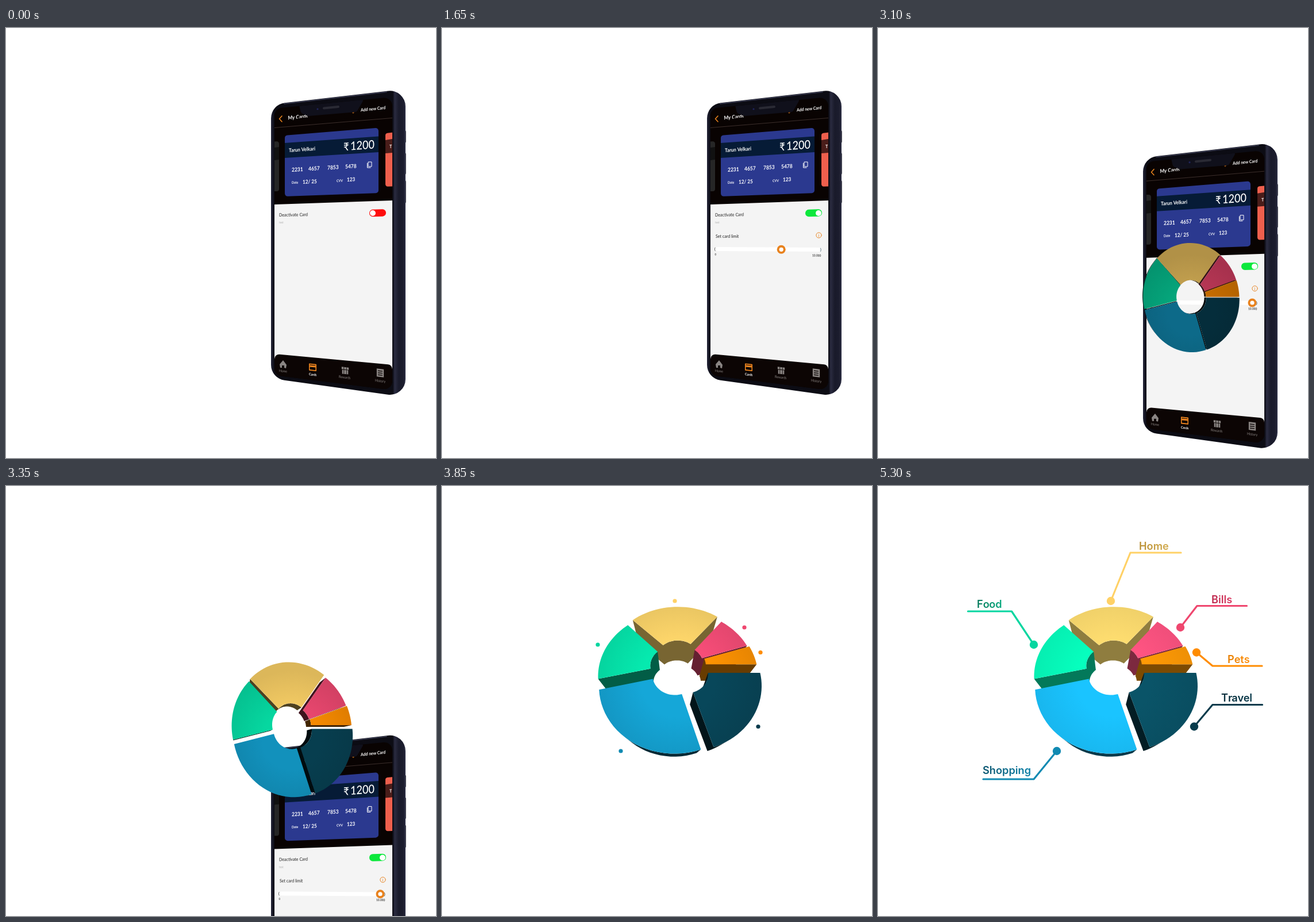
Recreate the animation shown at these times as an HTML page with a canvas. Size 748 px wide and 748 px high, loop 5350 ms.

```html
<!DOCTYPE html>
<html lang="en">
<head>
<meta charset="utf-8">
<title>Card spending</title>
<style>
html, body { margin: 0; width: 100%; height: 100%; overflow: hidden; background: #fff; }
canvas { display: block; width: 748px; height: 748px; }
</style>
</head>
<body>
<canvas id="stage" width="748" height="748"></canvas>
<script>
const ctx = document.getElementById('stage').getContext('2d');
const LOOP = 5350, STEP = 50;
const UI = 'Lato, "Noto Sans", sans-serif';

const clamp = v => Math.max(0, Math.min(1, v));
const span = (t, from, to) => clamp((t - from) / (to - from));
const smooth = v => v * v * (3 - 2 * v);
const mix = (a, b, f) => a + (b - a) * f;

// Piecewise linear value through [time, value] pairs
function track(t, keys) {
  let value = keys[0][1];
  for (let i = 1; i < keys.length; i++) {
    value = mix(value, keys[i][1], span(t, keys[i - 1][0], keys[i][0]));
  }
  return value;
}

function polygon(points, fill) {
  ctx.beginPath();
  points.forEach(p => ctx.lineTo(...p));
  ctx.closePath();
  ctx.fillStyle = fill;
  ctx.fill();
}

function roundPath(points, radius) {
  const last = points[points.length - 1], first = points[0];
  ctx.beginPath();
  ctx.moveTo((last[0] + first[0]) / 2, (last[1] + first[1]) / 2);
  points.forEach((p, i) => ctx.arcTo(...p, ...points[(i + 1) % points.length], radius));
  ctx.closePath();
}

function roundPoly(points, radius, fill) {
  roundPath(points, radius);
  ctx.fillStyle = fill;
  ctx.fill();
}

function line(points, color, width) {
  ctx.beginPath();
  points.forEach(p => ctx.lineTo(...p));
  ctx.strokeStyle = color;
  ctx.lineWidth = width;
  ctx.stroke();
}

function circle(x, y, r, fill) {
  ctx.beginPath();
  ctx.arc(x, y, r, 0, 2 * Math.PI);
  ctx.fillStyle = fill;
  ctx.fill();
}

// Draws in the plane of the turned screen, with the origin at x, y
function onScreen(x, y, draw) {
  ctx.save();
  ctx.transform(0.88, (y - 362) * 0.00042, 0, 1, x, y);
  draw();
  ctx.restore();
}

function label(text, x, y, size, color = '#fff', weight = 700) {
  onScreen(x, y, () => {
    ctx.font = `${weight} ${size}px ${UI}`;
    ctx.fillStyle = color;
    ctx.fillText(text, 0, 0);
  });
}

function drawBody() {
  [[178, 200], [217, 255], [265, 305]].forEach(([a, b]) =>
    roundPoly([[690, a], [695.7, a], [695.7, b], [690, b]], 2, '#10111c'));
  const metal = ctx.createLinearGradient(461, 0, 695, 0);
  [[0, '#25263a'], [0.025, '#0b0b13'], [0.905, '#0c0c14'], [0.92, '#2a2b40'],
   [0.95, '#191a2a'], [0.985, '#1c1d2e'], [1, '#303248']]
    .forEach(stop => metal.addColorStop(...stop));
  roundPoly([[461, 133], [695, 106], [695, 642], [461, 609.5]], 27, metal);
  line([[484, 131.8], [662, 111.3]], '#3c3e55', 1.6);
}

function drawCards() {
  roundPoly([[455, 198], [475, 197], [475, 284], [455, 284]], 4, '#262626');
  polygon([[467, 208], [475, 207], [475, 229], [467, 230]], '#111');
  roundPoly([[660, 183], [690, 180], [690, 275], [660, 276]], 4, '#ee5f4d');
  polygon([[660, 195], [672, 193], [672, 217], [660, 218]], '#4a1d1a');
  label('T', 667, 209, 8);

  roundPoly([[485, 187], [648, 173.5], [648, 287], [485, 293]], 5, '#2b398f');
  polygon([[485, 200], [648, 188.5], [648, 216], [485, 226]], '#061b36');
  label('Tarun Velkari', 492, 216, 9);
  label('₹', 587, 213.5, 19, '#fff', 500);
  label('1200', 599, 212.5, 20.5, '#fff', 500);
  ['2231', '4657', '7853', '5478'].forEach((digits, i) =>
    label(digits, 497 + i * 31 - (i == 1 ? 2 : 0), 250 - i * 1.8, 9.6));
  label('Date', 497, 271, 6);
  label('12/ 25', 516, 271, 9.3);
  label('CVV', 575, 268, 6);
  label('123', 593, 267, 9.3);
  ctx.strokeStyle = '#fff';
  ctx.lineWidth = 1;
  ctx.strokeRect(630.5, 233, 5.5, 8);
  line([[628.5, 235], [628.5, 243], [634, 243]], '#fff', 1);
}

function drawSettings(t) {
  label('Deactivate Card', 475, 328, 8, '#333', 500);
  label('test', 475, 340, 5.2, '#aaa', 400);
  const on = span(t, 900, 1050);
  roundPoly([[632, 316], [661, 315], [661, 327.5], [632, 328.5]], 6, on < 0.5 ? '#fe0c0c' : '#0ce83c');
  circle(mix(638, 655, on), 322, 5, '#fff');

  ctx.globalAlpha = span(t, 1050, 1250);
  label('Set card limit', 476, 365, 8, '#333', 500);
  ctx.beginPath();
  ctx.arc(655.5, 360.5, 4.6, 0, 7);
  ctx.strokeStyle = '#e8821e';
  ctx.lineWidth = 1;
  ctx.stroke();
  label('i', 654.5, 363.5, 7, '#e8821e');
  roundPoly([[475, 381], [660, 382], [660, 389], [475, 388]], 3, '#fff');
  label('(', 474, 387, 7, '#333');
  label(')', 658, 388, 7, '#245');
  label('0', 474.5, 395.5, 5, '#444');
  label('10.000', 644, 397.5, 5.6, '#444');
  const knob = mix(478, 651, smooth(span(t, 1300, 1883)));
  circle(knob, 385.3, 7.5, '#e8821e');
  circle(knob, 385.3, 3.6, '#fff');
  ctx.globalAlpha = 1;
}

function drawNav() {
  roundPoly([[467, 567], [672, 586], [672, 660], [467, 640]], 8, '#0c0504');
  const grey = '#8a8583';
  polygon([[476, 585], [482, 578], [488, 586], [487, 592], [484, 591], [484, 587],
           [480, 587], [480, 591], [477, 591]], grey);
  onScreen(533.5, 590, () => {
    ctx.strokeStyle = ctx.fillStyle = '#f0861f';
    ctx.lineWidth = 1.8;
    ctx.strokeRect(-6.5, -5, 13, 10.5);
    ctx.fillRect(-6, -3, 12, 3);
  });
  onScreen(590, 595, () => {
    ctx.fillStyle = grey;
    ctx.fillRect(-7, -5, 14, 4);
    ctx.fillRect(-6, 0, 12, 7);
    ctx.fillStyle = '#0c0504';
    ctx.fillRect(-3, -5, 1, 12);
    ctx.fillRect(2, -5, 1, 12);
  });
  onScreen(651, 600, () => {
    ctx.fillStyle = grey;
    ctx.fillRect(-7, -7, 14, 14);
    ctx.fillStyle = '#0c0504';
    [-4, -0.5, 3].forEach(y => ctx.fillRect(-4.5, y, 9, 1.4));
  });
  label('Home', 475, 598, 6, grey, 400);
  label('Cards', 527, 604, 6);
  label('Rewards', 579, 608.5, 6.2, grey, 400);
  label('History', 642, 615, 6.4, grey, 400);
}

function drawPhone(t) {
  const black = '#090302';
  ctx.save();
  ctx.translate(0, 0.927 * Math.max(0, t - 3000));
  drawBody();
  ctx.save();
  roundPath([[467, 140], [672, 120], [672, 630], [467, 604]], 14);
  ctx.clip();
  ctx.fillStyle = black;
  ctx.fillRect(460, 100, 220, 550);
  polygon([[467, 307], [672, 300], [672, 610], [467, 590]], '#f4f4f4');
  label('My Cards', 490.5, 159.5, 9.2);
  line([[480, 153], [475.5, 158], [480, 163]], '#e8821e', 1.6);
  label('+', 602, 150, 8, '#e8821e');
  polygon([[507, 157], [608, 148.5], [608, 156], [507, 166]], black);
  label('Add new Card', 617, 145.5, 7.8);
  line([[467, 173.5], [672, 156.5]], '#4a3a36', 0.8);
  roundPoly([[508, 125], [620, 113], [621, 127], [610, 146], [526, 153], [513, 148]], 5, '#10101b');
  line([[553, 139.5], [578, 137]], '#2a2a34', 4);
  circle(542, 141, 1.6, '#20235c');
  drawCards();
  drawSettings(t);
  drawNav();
  ctx.restore();
  ctx.restore();
}

// Angles in degrees, clockwise from the right; push is the final offset in radii.
// Listed from back to front.
const SLICES = [
  { from: 225, to: 309, push: [0, -0.142], flat: [255, 209, 102], lit: [255, 222, 112], wall: 0.52 },
  { from: 167, to: 226, push: [-0.077, -0.023], flat: [6, 214, 160], lit: [6, 255, 190], wall: 0.44 },
  { from: 309, to: 342, push: [0.054, -0.036], flat: [239, 71, 111], lit: [255, 84, 130], wall: 0.45 },
  { from: 342, to: 360, push: [0.086, -0.025], flat: [255, 140, 0], lit: [255, 154, 5], wall: 0.45 },
  { from: 0, to: 73, push: [0.108, 0.108], flat: [7, 59, 76], lit: [10, 84, 104], wall: 0.32 },
  { from: 73, to: 167, push: [-0.035, 0.133], flat: [17, 138, 178], lit: [26, 196, 255], wall: 0.27 }
];
const HOLE = 0.3;

function sliceOutline({ from, push }, end, project, spread) {
  const points = [], count = 24;
  const add = (radius, f) => {
    const a = mix(from, end, f) * Math.PI / 180;
    points.push(project(push[0] * spread + radius * Math.cos(a), push[1] * spread + radius * Math.sin(a)));
  };
  for (let i = 0; i <= count; i++) add(1, i / count);
  for (let i = count; i >= 0; i--) add(HOLE, i / count);
  return points;
}

function drawWalls(points, eye, depth, fill) {
  const sink = ([x, y]) => [mix(x, eye[0], depth), mix(y, eye[1], depth)];
  ctx.beginPath();
  points.forEach((a, i) => {
    const b = points[(i + 1) % points.length], a2 = sink(a), b2 = sink(b);
    const facing = (b[0] - a[0]) * (a2[1] - a[1]) - (b[1] - a[1]) * (a2[0] - a[0]);
    if (facing >= 0) return;
    ctx.moveTo(...a);
    [b, b2, a2].forEach(p => ctx.lineTo(...p));
    ctx.closePath();
  });
  ctx.fillStyle = fill;
  ctx.fill();
}

function drawPie(t) {
  const sweep = 360 * span(t, 2450, 3000);
  if (!sweep) return;
  const u = span(t, 3000, 3800), swing = u * (1 - u);
  const cx = mix(564, 410, u), cy = mix(487, 313, u - 0.15 * swing);
  const rx = mix(75, 127, u) + 12 * swing, ry = mix(83, 108, u) + 67 * swing;
  const tilt = 0.175 * u ** 1.4, skew = 0.2 * swing;
  const project = (x, y) => {
    const near = 1 / (1 - tilt * y);
    return [cx + rx * (x + skew * y) * near, cy + ry * y * near];
  };
  const eye = [400, 430 + 70 * u];
  const light = track(t, [[3100, 0], [3550, 0.4], [4600, 0.72], [5300, 1]]);
  const dim = track(t, [[3000, 1], [3100, 0.77], [3400, 1]]);
  const wallLight = track(t, [[3550, 0.6], [3800, 0.9], [5300, 1.08]]);
  const falloff = track(t, [[3000, 1], [3100, 0.9], [4600, 0.88], [5300, 0.92]]);

  for (const slice of SLICES) {
    const end = Math.min(slice.to, sweep);
    if (end <= slice.from) continue;
    const tone = f => `rgb(${slice.flat.map((v, i) => Math.round(mix(v, slice.lit[i], light) * dim * f))})`;
    const points = sliceOutline(slice, end, project, u);
    if (u) drawWalls(points, eye, 0.15 * u, tone(slice.wall * wallLight));
    const sheen = ctx.createRadialGradient(cx, cy + 25, rx * 0.5, cx, cy + 25, rx * 1.2);
    sheen.addColorStop(0, tone(1));
    sheen.addColorStop(1, tone(falloff));
    polygon(points, sheen);
  }
  if (sweep < 360) line([project(HOLE, 0), project(1, 0.02)], '#e8891c', 2);
}

const CALLOUTS = [
  { text: 'Home', at: [454, 110.5], ink: ['#b98f35', '#d2ac50'], color: '#ffd166', path: [[405, 200], [439, 116], [527, 116]] },
  { text: 'Food', at: [172, 212], ink: ['#087a5c', '#0aab80'], color: '#06d6a0', path: [[271, 276], [232.5, 218], [156.5, 218]] },
  { text: 'Bills', at: [580, 204], ink: ['#bd2a4e', '#dc3f66'], color: '#ef476f', path: [[526, 246], [555, 208.5], [641.5, 208.5]] },
  { text: 'Pets', at: [608, 308], ink: ['#e67e00', '#ff9210'], color: '#ff8c00', path: [[554, 289.5], [582, 313], [668, 313]] },
  { text: 'Travel', at: [597, 375], ink: ['#052c3a', '#08394a'], color: '#073b4c', path: [[550, 418.5], [582, 380.5], [668.5, 380.5]] },
  { text: 'Shopping', at: [182, 501], ink: ['#0b5670', '#1183aa'], color: '#118ab2', path: [[311, 461], [271, 510], [183, 510]] }
];

function drawCallout({ text, at, ink, color, path: [a, b, c] }, t) {
  const first = Math.hypot(b[0] - a[0], b[1] - a[1]);
  const second = Math.abs(c[0] - b[0]);
  const drawn = span(t, 3850, 4400) * (first + second);
  const f = clamp(drawn / first), g = clamp((drawn - first) / second);
  const points = [a, [mix(a[0], b[0], f), mix(a[1], b[1], f)]];
  if (g) points.push([mix(b[0], c[0], g), b[1]]);
  line(points, color, 3.2);
  circle(...a, 7.2 * span(t, 3800, 3900), color);

  // All words finish together; each letter fades in during its own share
  const typed = span(t, 4500, 5250) * text.length;
  ctx.font = '600 18.2px Inter, sans-serif';
  const fill = ctx.createLinearGradient(at[0], 0, at[0] + ctx.measureText(text).width, 0);
  ink.forEach((tone, i) => fill.addColorStop(i, tone));
  ctx.fillStyle = fill;
  [...text].forEach((letter, i) => {
    ctx.globalAlpha = clamp(typed - i);
    ctx.fillText(letter, at[0] + ctx.measureText(text.slice(0, i)).width, at[1]);
  });
  ctx.globalAlpha = 1;
}

function render(t) {
  ctx.fillStyle = '#fff';
  ctx.fillRect(0, 0, 748, 748);
  ctx.lineCap = ctx.lineJoin = 'round';
  if (t < 3720) drawPhone(t);
  drawPie(t);
  if (t > 3800) CALLOUTS.forEach(callout => drawCallout(callout, t));
}

function tick() {
  render(Math.floor(performance.now() % LOOP / STEP) * STEP);
  requestAnimationFrame(tick);
}
tick();
</script>
</body>
</html>
```
